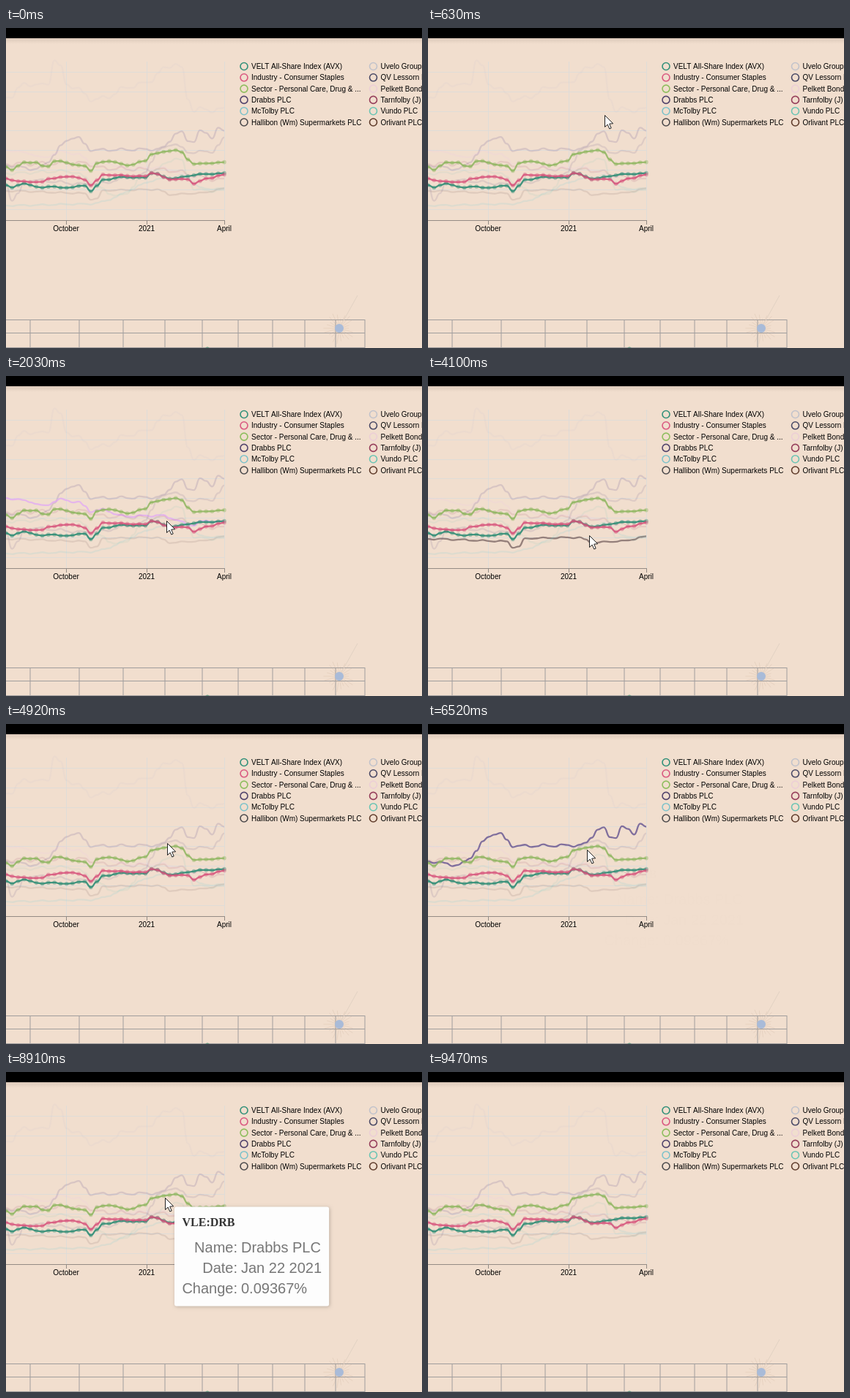
These frames come from a looping animation (568 px wide and 438 px high, 10 s). An HTML page with a canvas:

```html
<!DOCTYPE html>
<html lang="en">
<head>
<meta charset="utf-8">
<style>
html, body { margin: 0; width: 100%; height: 100%; overflow: hidden; background: #f1dece; }
canvas { display: block; }
</style>
</head>
<body>
<canvas id="stage" width="568" height="438"></canvas>
<script>
const ctx = document.getElementById('stage').getContext('2d');
const LOOP = 10000, WEEK = 8.28, WEEKS = 37, RIGHT = 298;
const SANS = '"Liberation Sans", Arial, sans-serif';
const SERIF = '"Liberation Serif", "Times New Roman", serif';

const clamp = v => Math.max(0, Math.min(1, v));
const smooth = k => (1 - Math.cos(Math.PI * k)) / 2;
const pulse = (t, on, off, fade = 140) => clamp((t - on) / fade) * clamp(1 - (t - off) / fade);

// Eased value between key points [position, value, ...]
function at(keys, pos, column = 1) {
  const i = Math.max(1, keys.findIndex(k => k[0] >= pos));
  const a = keys[i - 1], b = keys[i];
  return a[column] + (b[column] - a[column]) * smooth(clamp((pos - a[0]) / (b[0] - a[0])));
}

// A price line: weekly samples of a trend plus a small ripple
function series(color, opacity, ripple, ...keys) {
  const points = Array.from({ length: WEEKS }, (_, i) => {
    const x = RIGHT - (WEEKS - 1 - i) * WEEK;
    return [x, at(keys, x) + ripple * Math.sin(i * 1.9)];
  });
  return { color, opacity, points };
}

const bakery = series('#5b4a8c', .17, 2, [0, 188], [40, 193], [95, 149], [118, 167], [210, 166],
  [237, 142], [253, 157], [268, 140], [280, 150], [291, 137], [298, 142]);
const staple = series('#e2a9f4', .08, 1.5, [0, 167], [30, 171], [50, 178], [75, 169], [100, 173],
  [116, 185], [133, 183], [160, 192], [210, 191], [257, 204], [270, 198], [298, 200]);
const grocer = series('#77605f', .15, 1, [0, 223], [105, 226], [120, 236], [135, 222],
  [207, 221], [224, 228], [265, 226], [298, 220]);
const dimLines = [
  bakery, staple, grocer,
  series('#5c4c83', .13, 2, [0, 214], [9, 235], [30, 208], [116, 214], [184, 203], [210, 167], [228, 158], [250, 170], [283, 169], [298, 151]),
  series('#9a4a6c', .13, 3, [0, 186], [110, 185], [130, 192], [210, 194], [298, 208]),
  series('#79cbd0', .16, 1, [0, 243], [110, 241], [224, 205], [240, 202], [270, 220], [298, 220]),
  series('#6dc5b4', .1, 2, [0, 199], [83, 196], [158, 230], [190, 201], [235, 178], [260, 222], [298, 223]),
  series('#b9b7cf', .1, 4, [0, 95], [30, 76], [55, 80], [67, 42], [85, 78], [122, 98], [180, 78], [235, 48], [255, 112], [298, 112])
];
const mainLines = [
  series('#8ab45b', .8, .5, [0, 190], [8, 194], [25, 184], [41, 184], [54, 191], [67, 182], [108, 189], [116, 195],
    [125, 185], [141, 182], [166, 188], [190, 182], [200, 172], [233, 167], [258, 186], [298, 184]),
  series('#2f8d76', .9, .5, [0, 215], [8, 218], [25, 213], [50, 219], [62, 216], [75, 219], [108, 216], [116, 223],
    [133, 208], [158, 204], [190, 205], [199, 198], [224, 206], [270, 200], [298, 199]),
  series('#d6527b', .85, .5, [0, 206], [17, 210], [50, 211], [58, 206], [91, 203], [108, 208], [116, 215],
    [133, 201], [190, 203], [199, 198], [224, 207], [249, 207], [257, 213], [274, 206], [298, 201])
];

const legend = [
  ['#33917a', 'VELT All-Share Index (AVX)'], ['#da5880', 'Industry - Consumer Staples'],
  ['#8fbe5f', 'Sector - Personal Care, Drug & ...'], ['#54466d', 'Drabbs PLC'],
  ['#80c3ca', 'McTolby PLC'], ['#4c4a4c', 'Hallibon (Wm) Supermarkets PLC'],
  ['#c2c3cb', 'Uvelo Group PLC'], ['#4b4a66', 'QV Lessorn PLC'],
  ['#eccfd6', 'Pelkett Bond PLC'], ['#97405c', 'Tarnfolby (J) PLC'],
  ['#6dc5b4', 'Vundo PLC'], ['#603c2b', 'Orlivant PLC']
];

// Pointer keys: time, x, y
const pointer = [
  [70, 262, 366], [280, 242, 113], [630, 241, 119], [1050, 214, 146], [1610, 218, 183], [2030, 219, 198],
  [2980, 220, 218], [4360, 220, 218], [4920, 220, 163], [5530, 217, 172], [8910, 217, 172], [9400, 214, 425]
];

// Line, time on, time off
const highlights = [
  [bakery, 1260, 1470], [staple, 1850, 2230], [grocer, 2800, 4400], [staple, 4500, 4640], [bakery, 5440, 6600]
];

// Time on, time off, x, y, code, name, date, change
const tips = [
  [210, 460, 254, 127, 'VLE:UVL', 'Uvelo Group PLC', 'Feb 05 2021', '1.46218%'],
  [1680, 1870, 230, 207, 'VLE:PLK', 'Pelkett Bond', 'Jan 22 2021', '0.05142%'],
  [6520, 8960, 230, 184.5, 'VLE:DRB', 'Drabbs PLC', 'Jan 22 2021', '0.09367%']
];

function text(str, x, y, size, color, align = 'left', font = SANS, weight = '') {
  ctx.font = `${weight} ${size}px ${font}`;
  ctx.fillStyle = color;
  ctx.textAlign = align;
  ctx.fillText(str, x, y);
}

function line(x1, y1, x2, y2, color) {
  ctx.strokeStyle = color;
  ctx.lineWidth = 1;
  ctx.beginPath();
  ctx.moveTo(x1, y1);
  ctx.lineTo(x2, y2);
  ctx.stroke();
}

function circle(x, y, r) {
  ctx.beginPath();
  ctx.arc(x, y, r, 0, 7);
}

function disc(x, y, r, color) {
  ctx.fillStyle = color;
  circle(x, y, r);
  ctx.fill();
}

function curve({ points, color }, alpha) {
  ctx.globalAlpha = alpha;
  ctx.strokeStyle = color;
  ctx.lineWidth = 2.3;
  ctx.beginPath();
  points.forEach(([x, y], i) => {
    if (!i) return ctx.moveTo(x, y);
    const [px, py] = points[i - 1], mid = (px + x) / 2;
    ctx.bezierCurveTo(mid, py, mid, y, x, y);
  });
  ctx.stroke();
  ctx.globalAlpha = 1;
}

function drawPage() {
  ctx.fillStyle = '#f1dece';
  ctx.fillRect(0, 0, 568, 438);
  const shade = ctx.createLinearGradient(0, 14, 0, 22);
  shade.addColorStop(0, 'rgba(90,70,60,.13)');
  shade.addColorStop(1, 'rgba(90,70,60,0)');
  ctx.fillStyle = shade;
  ctx.fillRect(0, 14, 568, 8);
  ctx.fillStyle = '#000';
  ctx.fillRect(0, 0, 568, 14);

  legend.forEach(([color, label], i) => {
    const x = i < 6 ? 325 : 501.5, y = 52.5 + (i % 6) * 15.3;
    ctx.strokeStyle = color;
    ctx.lineWidth = 1.6;
    circle(x, y, 5);
    ctx.stroke();
    text(label, x + 10, Math.round(y + 3.5), 10, '#000');
  });
}

function drawChart(t) {
  for (let y = 60; y < 260; y += 26.8) line(0, Math.round(y) + .5, RIGHT, Math.round(y) + .5, '#dfdcd8');
  for (const x of [82, 192, RIGHT]) line(x + .5, 46, x + .5, 263, '#dfdcd8');

  for (const l of dimLines) {
    const lit = Math.max(...highlights.map(([h, on, off]) => h === l ? pulse(t, on, off) : 0));
    curve(l, l.opacity + (.75 - l.opacity) * lit);
  }
  for (const l of mainLines) {
    curve(l, l.opacity);
    ctx.globalAlpha = .4;
    for (const [x, y] of l.points) disc(x, y, 2.8, l.color);
    ctx.globalAlpha = 1;
  }

  line(0, 263.5, RIGHT + 1, 263.5, '#948b85');
  [[82, 'October'], [192, '2021'], [RIGHT, 'April']].forEach(([x, label]) => {
    line(x + .5, 263, x + .5, 269, '#948b85');
    text(label, x, 278, 10, '#000', 'center');
  });
}

function drawTable() {
  for (const y of [399.5, 417.5, 437.5]) line(0, y, 490, y, '#a09d9d');
  for (const x of [33, 100, 160, 217, 268, 317, 364, 408, 450, 490]) line(x, 399, x, 438, '#a09d9d');
  for (let i = 0; i < 22; i++) {
    const a = i * Math.PI / 11, r = 13 + 9 * Math.abs(Math.sin(i * 2.4));
    line(455, 411, 455 + r * Math.cos(a), 411 + r * Math.sin(a), 'rgba(190,165,140,.22)');
  }
  line(455, 411, 480, 366, '#e2d2c3');
  disc(455, 411, 6, '#a9bbd8');
  disc(275, 439.5, 3, '#5f8f7c');
}

function drawTip(t, [on, off, x, y, code, ...values]) {
  const alpha = pulse(t, on, off);
  if (!alpha) return;
  ctx.save();
  ctx.globalAlpha = alpha;
  ctx.font = `20px ${SANS}`;
  const width = 101 + Math.max(...values.map(v => ctx.measureText(v).width));
  ctx.shadowColor = 'rgba(0,0,0,.22)';
  ctx.shadowBlur = 5;
  ctx.shadowOffsetX = ctx.shadowOffsetY = 1;
  ctx.fillStyle = '#fdfdfd';
  ctx.beginPath();
  ctx.roundRect(x, y, width, 136, 3);
  ctx.fill();
  ctx.shadowColor = 'transparent';
  text(code, x + 10.5, y + 26.5, 16, '#333', 'left', SERIF, 'bold');
  ['Name:', 'Date:', 'Change:'].forEach((label, i) => {
    const base = y + 62.5 + i * 28;
    text(label, x + 86, base, 20, '#777', 'right');
    text(values[i], x + 91, base, 20, '#777');
  });
  ctx.restore();
}

function drawPointer(t) {
  if (t < pointer[0][0] || t > pointer.at(-1)[0]) return;
  ctx.save();
  ctx.translate(at(pointer, t) + .5, at(pointer, t, 2) + .5);
  const shape = new Path2D('M0 0V16L3.7 12.6 6.3 18.5 8.7 17.5 6.2 11.6 11.2 11.3Z');
  ctx.fillStyle = '#fff';
  ctx.fill(shape);
  ctx.strokeStyle = '#222';
  ctx.lineWidth = 1;
  ctx.stroke(shape);
  ctx.restore();
}

const start = performance.now();
function frame() {
  const t = (performance.now() - start) % LOOP;
  drawPage();
  drawChart(t);
  drawTable();
  for (const tip of tips) drawTip(t, tip);
  drawPointer(t);
  requestAnimationFrame(frame);
}
frame();
</script>
</body>
</html>
```
